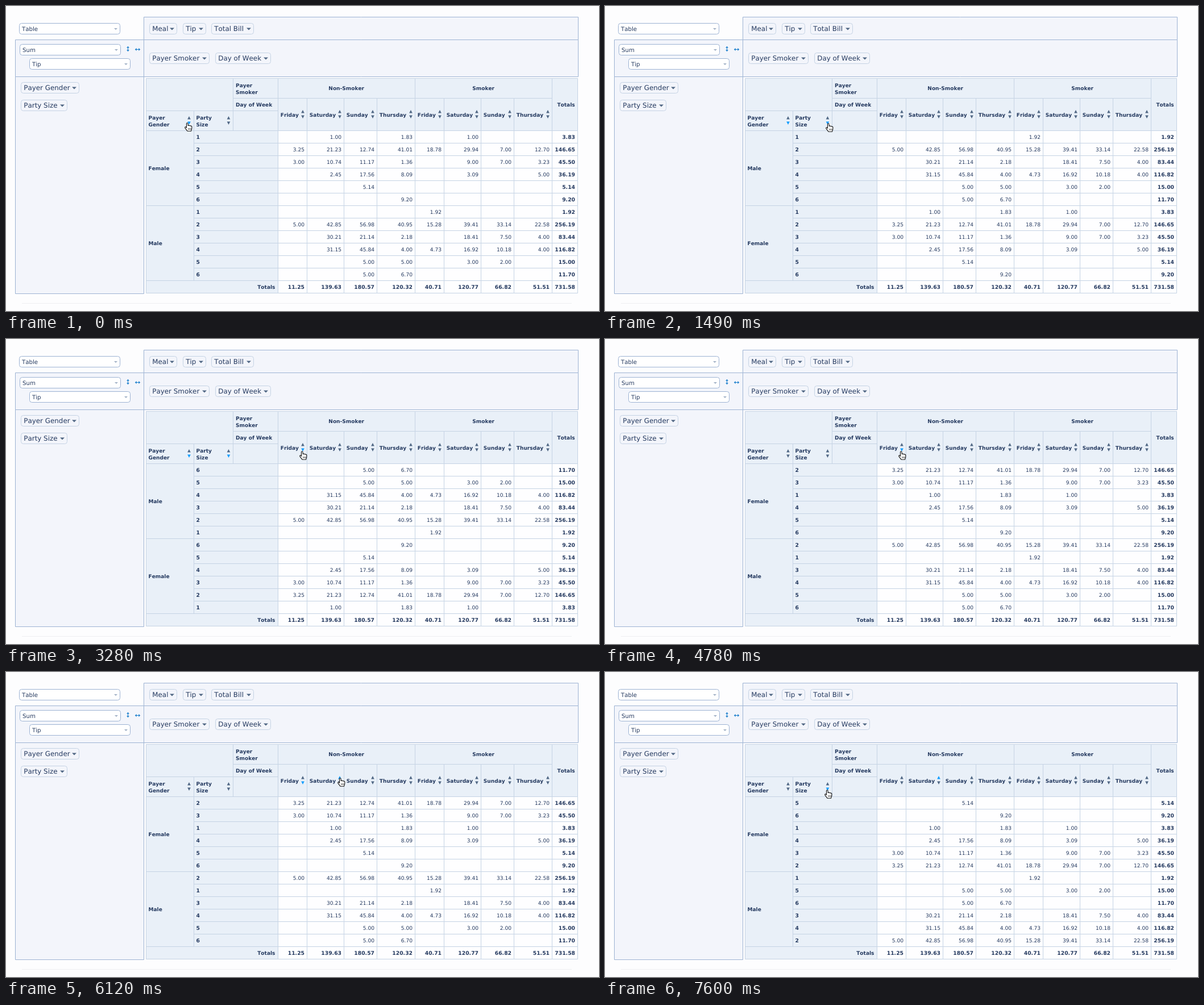
Recreate the animation shown at these times as an HTML page with a canvas. Size 1043 px wide and 537 px high, loop 8 s.

```html
<!DOCTYPE html>
<html lang="en">
<head>
<meta charset="utf-8">
<title>Pivot table sorting</title>
<style>
  html, body { margin: 0; width: 100%; height: 100%; overflow: hidden; background: #fdfdfe; }
  canvas { display: block; }
</style>
</head>
<body>
<canvas id="stage" width="1043" height="537"></canvas>
<script>
const ctx = document.getElementById('stage').getContext('2d');
const LOOP = 8000;
const INK = '#253a60', HEAD = '#e9f0f8', PANEL = '#f3f5fb', GRID = '#c5d3e4';
const EDGE = '#9db3d3', ARROW = '#506784', BLUE = '#119dff';
const FAMILY = '"DejaVu Sans", Verdana, sans-serif';
const CELL = `9.1px ${FAMILY}`, BOLD = `bold 9.05px ${FAMILY}`, TOTAL = `bold 9.25px ${FAMILY}`;
const LABEL = `11.9px ${FAMILY}`, SELECT = `10.2px ${FAMILY}`;

const columns = [478, 529, 594, 652, 719, 770, 835, 893, 960, 1005];
const days = ['Friday', 'Saturday', 'Sunday', 'Thursday'];
const ROW = 22, TOP = 219;

// Tip sums by party size: four non-smoker days, then four smoker days.
const sum = list => list.reduce((a, b) => a + b, 0);
const parse = text => text.trim().split('\n').map((line, i) => {
  const values = line.trim().split(' ').map(v => v === '-' ? 0 : +v);
  return { size: i + 1, values, total: sum(values) };
});
const groups = {
  Female: parse(`- 1.00 - 1.83 - 1.00 - -
    3.25 21.23 12.74 41.01 18.78 29.94 7.00 12.70
    3.00 10.74 11.17 1.36 - 9.00 7.00 3.23
    - 2.45 17.56 8.09 - 3.09 - 5.00
    - - 5.14 - - - - -
    - - - 9.20 - - - -`),
  Male: parse(`- - - - 1.92 - - -
    5.00 42.85 56.98 40.95 15.28 39.41 33.14 22.58
    - 30.21 21.14 2.18 - 18.41 7.50 4.00
    - 31.15 45.84 4.00 4.73 16.92 10.18 4.00
    - - 5.00 5.00 - 3.00 2.00 -
    - - 5.00 6.70 - - - -`)
};
const allRows = [...groups.Female, ...groups.Male];
const columnTotals = days.concat(days).map((_, i) => sum(allRows.map(r => r.values[i])));
columnTotals.push(sum(columnTotals));

const bySizeDown = (a, b) => b.size - a.size;
const sorts = [
  { at: 0, active: [] },
  { at: 600, active: ['gender-down'], maleFirst: true },
  { at: 1940, active: ['gender-down', 'size-down'], maleFirst: true, compare: bySizeDown },
  { at: 4780, active: ['0-down'], compare: (a, b) => b.values[0] - a.values[0] },
  { at: 6720, active: ['1-up'], compare: (a, b) => a.values[1] - b.values[1] }
];

// Pointer moves: quadratic curves, advanced in discrete steps.
const moves = [
  { start: 890, end: 1490, steps: 5, path: [[314, 205], [424, 195], [388, 206]] },
  { start: 2690, end: 3280, steps: 5, path: [[388, 206], [420, 214], [516, 197]] },
  { start: 5230, end: 6120, steps: 7, path: [[516, 197], [545, 198], [583, 186]] },
  { start: 6867, end: 7600, steps: 6, path: [[583, 186], [480, 200], [386, 207]] }
];

const sorters = [
  { id: 'gender', x: 322, y: 201.5 },
  { id: 'size', x: 391.5, y: 201.5 },
  ...columnTotals.slice(0, 8).map((_, i) => ({ id: `${i}`, x: columns[i + 1] - 7, y: 190.5 }))
];

const hand = new Path2D('M3.5 9.5V2.2Q3.5.7 4.8.7Q6 .7 6 2.2L6.2 5.5Q7.5 4.6 8.4 5.8Q9.8 5 10.7 6.2Q12.8 5.8 12.9 8L12.7 11L11.5 15.3H5.2L1 9.8Q.3 8.2 1.6 7.8Q2.6 7.7 3.5 9.5Z');
const knuckles = new Path2D('M6.8 10V13M8.8 10V13M10.8 10V13');

function text(str, x, middle, font, align = 'left') {
  ctx.font = font;
  ctx.textAlign = align;
  ctx.fillStyle = INK;
  ctx.fillText(str, x, middle + parseFloat(font.replace('bold ', '')) * 0.365);
}

function box(x1, y1, x2, y2, fill, stroke, radius = 0) {
  ctx.beginPath();
  ctx.roundRect(x1 + 0.5, y1 + 0.5, x2 - x1, y2 - y1, radius);
  ctx.fillStyle = fill;
  ctx.fill();
  ctx.strokeStyle = stroke;
  ctx.lineWidth = 1;
  ctx.stroke();
}

// A positive height points down, a negative one up.
function triangle(x, y, halfWidth, height, color) {
  ctx.beginPath();
  ctx.moveTo(x - halfWidth, y - height / 2);
  ctx.lineTo(x + halfWidth, y - height / 2);
  ctx.lineTo(x, y + height / 2);
  ctx.fillStyle = color;
  ctx.fill();
}

function attribute(name, x1, x2, y) {
  box(x1, y - 10, x2, y + 9, PANEL, GRID, 4);
  text(name, x1 + 5.3, y, LABEL);
  triangle(x2 - 8, y + 0.5, 4, 4, ARROW);
}

function dropdown(name, x, y) {
  box(x, y, x + 177, y + 19, '#fff', EDGE, 4);
  text(name, x + 5, y + 10, SELECT);
  triangle(x + 170, y + 10.5, 3, 3, '#a2b1c6');
}

function doubleArrow(x, y, angle) {
  ctx.save();
  ctx.translate(x, y);
  ctx.rotate(angle);
  ctx.fillStyle = '#1f80cc';
  ctx.fillRect(-0.5, -3, 1, 6);
  triangle(0, -3.3, 2.5, -3, '#1f80cc');
  triangle(0, 3.3, 2.5, 3, '#1f80cc');
  ctx.restore();
}

function drawPanels() {
  ctx.fillStyle = '#fdfdfe';
  ctx.fillRect(0, 0, 1043, 537);
  box(242, 19, 1006, 59, PANEL, EDGE);
  box(242, 59, 1006, 124, PANEL, EDGE);
  box(16, 59, 242, 124, PANEL, EDGE);
  box(16, 124, 242, 506, PANEL, EDGE);
  dropdown('Table', 23, 30);
  dropdown('Sum', 24, 67);
  dropdown('Tip', 41, 92);
  doubleArrow(214.5, 75.5, 0);
  doubleArrow(231.5, 76.5, Math.PI / 2);
  attribute('Meal', 252, 300, 40);
  attribute('Tip', 311, 351, 40);
  attribute('Total Bill', 361, 435, 40);
  attribute('Payer Smoker', 252, 357, 92);
  attribute('Day of Week', 368, 465, 92);
  attribute('Payer Gender', 26, 128, 144);
  attribute('Party Size', 26, 107, 175);
  ctx.fillStyle = '#eeeff1';
  ctx.fillRect(28, 523, 967, 1);
}

function drawHeader() {
  const cell = (x1, y1, x2, y2) => box(x1, y1, x2, y2, HEAD, GRID);
  cell(246, 127, 399, 184);
  cell(399, 127, 478, 162);
  cell(399, 162, 478, 184);
  cell(246, 184, 330, TOP);
  cell(330, 184, 399, TOP);
  cell(399, 184, 478, TOP);
  cell(478, 127, 719, 162);
  cell(719, 127, 960, 162);
  cell(960, 127, 1005, TOP);
  text('Payer', 404, 139.5, BOLD);
  text('Smoker', 404, 152, BOLD);
  text('Day of Week', 404, 174, BOLD);
  text('Payer', 250.5, 196.5, BOLD);
  text('Gender', 250.5, 209, BOLD);
  text('Party', 334.5, 196.5, BOLD);
  text('Size', 334.5, 209, BOLD);
  text('Non-Smoker', 598.7, 145, BOLD, 'center');
  text('Smoker', 839.7, 145, BOLD, 'center');
  text('Totals', 1000.7, 174, BOLD, 'right');
  days.concat(days).forEach((day, i) => {
    cell(columns[i], 162, columns[i + 1], TOP);
    text(day, columns[i] + 4.8, 191.5, BOLD);
  });
}

function drawNumbers(values, y, boldAll) {
  values.forEach((value, i) => {
    box(columns[i], y, columns[i + 1], y + ROW, '#fefeff', GRID);
    const font = boldAll || i === 8 ? TOTAL : CELL;
    if (value) text(value.toFixed(2), columns[i + 1] - 4, y + 11.5, font, 'right');
  });
}

function drawBody(sort) {
  const names = sort.maleFirst ? ['Male', 'Female'] : ['Female', 'Male'];
  names.forEach((name, g) => {
    const y = TOP + g * 6 * ROW;
    box(246, y, 330, y + 6 * ROW, HEAD, GRID);
    text(name, 250.5, y + 66.5, BOLD);
    const rows = [...groups[name]].sort(sort.compare || (() => 0));
    rows.forEach((row, i) => {
      const rowY = y + i * ROW;
      box(330, rowY, 478, rowY + ROW, HEAD, GRID);
      text(row.size, 334.5, rowY + 11.5, TOTAL);
      drawNumbers([...row.values, row.total], rowY, false);
    });
  });
  const y = TOP + 12 * ROW;
  box(246, y, 478, y + ROW, HEAD, GRID);
  text('Totals', 473.5, y + 11.5, BOLD, 'right');
  drawNumbers(columnTotals, y, true);
}

function pointerAt(t) {
  const move = moves.filter(m => t >= m.start).pop();
  if (!move) return moves[0].path[0];
  const { start, end, steps, path: [a, b, c] } = move;
  const step = Math.floor((t - start) / (end - start) * (steps - 1) + 1e-6) + 1;
  const p = Math.min(1, step / steps), q = 1 - p;
  return a.map((v, i) => Math.round(q * q * v + 2 * q * p * b[i] + p * p * c[i]));
}

function drawSorters(sort, [px, py]) {
  const tipX = px + 4.5, tipY = py + 2;
  for (const { id, x, y } of sorters) {
    for (const [name, sign] of [['up', -1], ['down', 1]]) {
      const arrowY = y + sign * 4.7;
      const hovered = Math.abs(tipX - x) < 6 && Math.abs(tipY - arrowY) < 4.5;
      const lit = hovered || sort.active.includes(`${id}-${name}`);
      triangle(x, arrowY, 2.8, sign * 5.5, lit ? BLUE : ARROW);
    }
  }
}

function drawHand([x, y]) {
  ctx.save();
  ctx.translate(x, y);
  ctx.fillStyle = '#fff';
  ctx.strokeStyle = '#111';
  ctx.lineJoin = 'round';
  ctx.lineWidth = 1.1;
  ctx.fill(hand);
  ctx.stroke(hand);
  ctx.lineWidth = 0.7;
  ctx.stroke(knuckles);
  ctx.restore();
}

function render() {
  const t = (performance.now() - begin) % LOOP;
  const sort = sorts.filter(s => t >= s.at).pop();
  const pointer = pointerAt(t);
  drawPanels();
  drawHeader();
  drawBody(sort);
  drawSorters(sort, pointer);
  drawHand(pointer);
  requestAnimationFrame(render);
}

ctx.fontKerning = 'none';
ctx.textRendering = 'geometricPrecision';
const begin = performance.now();
render();
</script>
</body>
</html>
```
